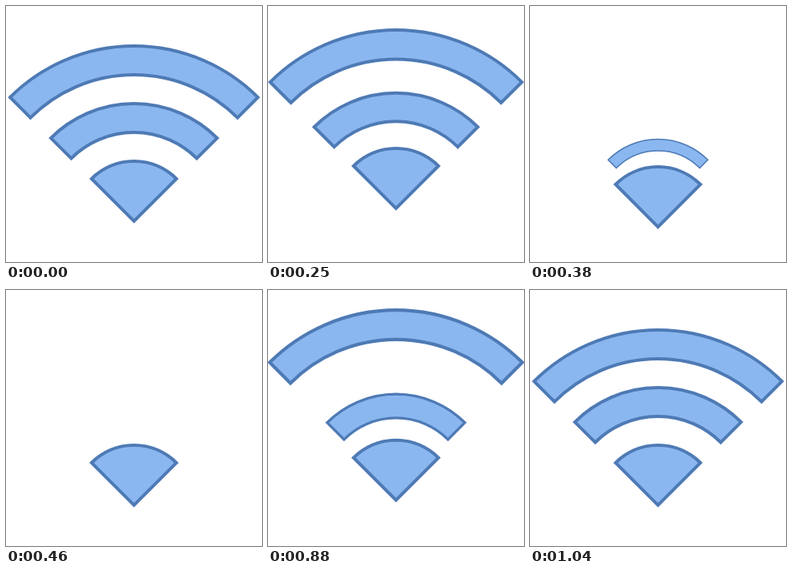
Recreate the animation shown at these times as an HTML page. Size 320x320 px, loop 1.18 s.

```html
<!DOCTYPE html>
<html lang="en">
<head>
<meta charset="utf-8">
<title>Wireless signal</title>
<style>
  html, body { margin: 0; width: 100%; height: 100%; overflow: hidden; background: #fff; }
  svg { display: block; width: 100%; height: 100%; }
  path { fill: #8bb7f0; stroke: #4e7ab5; stroke-width: 4; stroke-miterlimit: 4; }
</style>
</head>
<body>
<svg viewBox="0 0 320 320">
  <path id="outer"/>
  <path id="middle"/>
  <path id="fan"/>
</svg>
<script>
const LOOP = 1180, FPS = 24;
const REST = 269;                 // common centre of all arcs
const RADIUS = 75, BAND = 36;     // fan radius, width of bands and gaps
const [outer, middle, fan] = document.querySelectorAll('path');

const clamp = x => Math.min(1, Math.max(0, x));

// Half a sine wave between a and b, flat elsewhere.
const hump = (u, a, b) => Math.sin(Math.PI * clamp((u - a) / (b - a)));

// Scale falling from 1 to 0 between a and b.
const shrink = (u, a, b) => 1 - clamp((u - a) / (b - a)) ** 1.3;

// 0 is the full signal, 1 the lone fan: collapse first, then the reverse.
const phase = (t, returnTime) => clamp(Math.min((t - 130) / 330, (1040 - t) / returnTime));

// Start of the film frame showing at time t, in whole hundredths of a second.
function hold(t) {
  const onset = n => Math.round(n * 100 / FPS) * 10;
  const n = Math.floor((t + 5) * FPS / 1000);
  return onset(n) > t ? onset(n - 1) : onset(n);
}

// Quarter ring opening upwards around the local origin.
function ring(radius, inner) {
  const a = radius * Math.SQRT1_2, b = inner * Math.SQRT1_2;
  const back = inner ? `L${b} ${-b}A${inner} ${inner} 0 0 0 ${-b} ${-b}` : 'L0 0';
  return `M${-a} ${-a}A${radius} ${radius} 0 0 1 ${a} ${-a}${back}Z`;
}

function place(part, lift, scale = 1) {
  part.setAttribute('visibility', scale > 0.01 ? 'visible' : 'hidden');
  part.setAttribute('transform', `translate(160 ${REST - lift}) scale(${scale})`);
}

function draw(ms) {
  const t = hold(ms % LOOP);
  const u = phase(t, 330), v = phase(t, 290);
  const leap = hump(u, 0.12, 0.96);
  place(outer, 21 * leap, (1 + 0.02 * leap) * shrink(u, 0.5, 0.88));
  place(middle, 17.2 * hump(u, 0.06, 0.9), shrink(u, 0.34, 0.9));
  place(fan, 16.5 * hump(v, 0, 0.63) - 8 * hump(v, 0.63, 1));
}

fan.setAttribute('d', ring(RADIUS, 0));
middle.setAttribute('d', ring(RADIUS + 2 * BAND, RADIUS + BAND));
outer.setAttribute('d', ring(RADIUS + 4 * BAND, RADIUS + 3 * BAND));

let start;
function tick(now) {
  start ??= now;
  draw(Math.max(0, now - start));
  requestAnimationFrame(tick);
}
draw(0);
requestAnimationFrame(tick);
</script>
</body>
</html>
```
